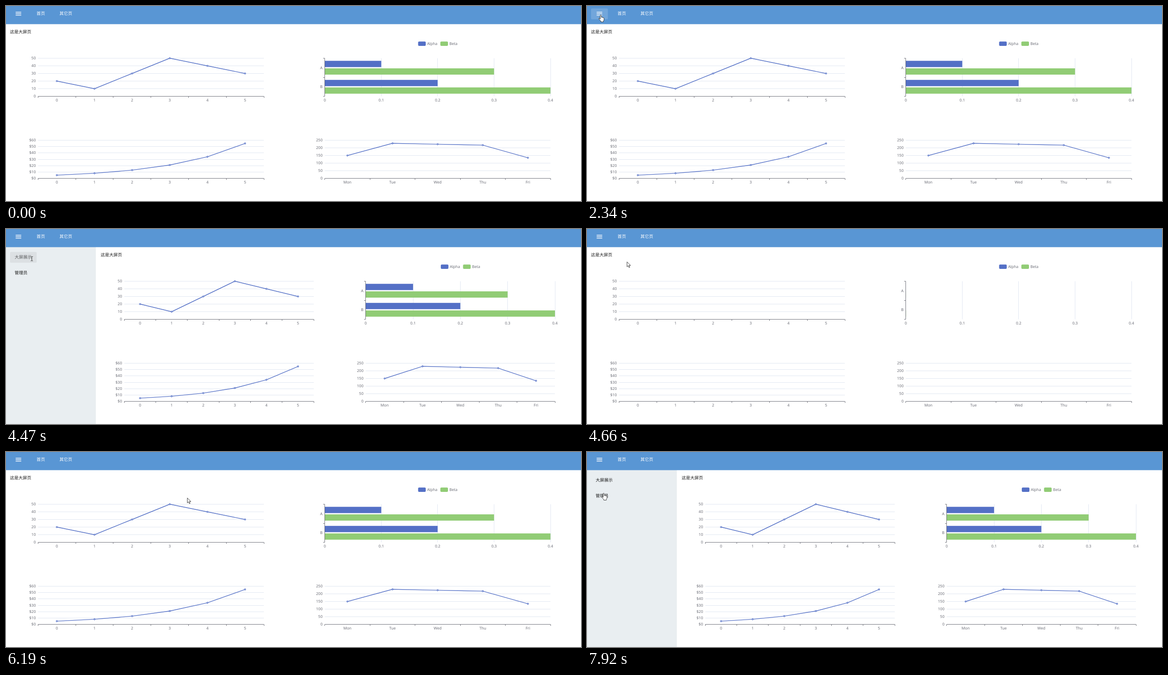
These frames come from a looping animation (1280 px wide and 435 px high, 7.99 s). An HTML page:

```html
<!DOCTYPE html>
<html lang="zh">
<head>
<meta charset="utf-8">
<title>大屏页</title>
<style>
  html, body { margin: 0; width: 100%; height: 100%; overflow: hidden; background: #fff; }
  svg { display: block; width: 100vw; height: 100vh; text-rendering: geometricPrecision; }
  text { font: 8.5px "Noto Sans", "Open Sans", sans-serif; fill: #6e7079; }
  .cjk { font: 9.5px "Noto Sans CJK SC", "Noto Sans CJK", sans-serif; fill: #1c1c1c; }
  .nav { fill: #fff; }
  .dim { fill: #5c5e60; }
  .mid { text-anchor: middle; }
  .end { text-anchor: end; }
  .split { stroke: #e0e6f1; }
  .axis { stroke: #6e7079; fill: none; }
  .line { stroke: #5470c6; stroke-width: 1.4; fill: none; stroke-linejoin: bevel; }
  .dot { fill: #fff; stroke: #5470c6; }
  .pointer { fill: #fff; stroke: #222; stroke-width: .9; stroke-linejoin: round; }
</style>
</head>
<body>
<svg id="stage" viewBox="0 0 1280 435"></svg>
<script>
const LOOP = 7990;
const BLUE = '#5470c6', GREEN = '#91cc75';
const CLICKS = [2367, 7117], REMOUNT = 4540;

// Screen refreshes: [first, last, count]
const REFRESH = [
  [0, 0, 1], [190, 470, 5], [860, 860, 1], [1060, 1800, 12], [1870, 1870, 1],
  [2080, 2210, 3], [2340, 2820, 8], [3030, 3790, 12], [4000, 4260, 5],
  [4470, 5220, 12], [5290, 6050, 12], [6120, 6870, 12], [7010, 7780, 12], [7850, 7920, 2]
].flatMap(([a, b, n]) => Array.from({ length: n }, (_, i) =>
  Math.round((a + (n > 1 ? (b - a) * i / (n - 1) : 0)) / 10) * 10));

// Pointer hot spots: [time, x, y, shape from here on]
const PATH = [
  [190, 1110, 412, 'arrow'], [470, 347, 109, 'arrow'], [800, 347, 109, 'arrow'],
  [860, 343, 96, 'arrow'], [1000, 343, 96, 'arrow'], [1800, 31, 21, 'hand'],
  [1870, 30.5, 20, 'hand'], [2960, 30.5, 20, 'arrow'], [3400, 138, 64, 'arrow'],
  [3790, 48, 58, 'hand'], [3940, 48, 58, 'hand'], [4260, 48, 63, 'hand'],
  [4470, 57.5, 66, 'beam'], [4540, 70, 70, 'arrow'], [5080, 484, 142, 'arrow'],
  [5220, 488, 146, 'arrow'], [5600, 488, 146, 'arrow'], [6050, 435, 110, 'arrow'],
  [6870, 31, 14, 'hand'], [7400, 31, 14, 'arrow'], [7780, 44, 82, 'arrow'],
  [7850, 40, 88, 'hand'], [7920, 37, 92, 'hand'], [LOOP, 37, 92, 'hand']
];

const SHAPES = {
  arrow: '<path class="pointer" d="M0 0V11L2.6 8.6 4.4 12.7 6.2 11.9 4.4 8H7.9Z"/>',
  hand: '<path class="pointer" d="M-1.1 9.3V1.2Q-1 0 .1 0T1.4 1.2V5.2Q2.6 4.4 3.5 5.6 4.8 4.9 5.5 6.1 7.3 5.7 7.4 7.6V10.4Q7.2 12.4 6 13.6V15.4H.4V14Q-1.6 12-4.2 8.5-4.6 7-3.2 7.1Z"/>',
  beam: '<path class="axis" style="stroke:#333" d="M-2.5-4.5H-.8L0-4 .8-4.5H2.5M0-4V4.5M-2.5 5H-.8L0 4.5 .8 5H2.5"/>'
};

const clamp = v => Math.min(1, Math.max(0, v));
const smooth = v => v * v * (3 - 2 * v);
const cubicInOut = v => v < .5 ? 4 * v ** 3 : 1 - 4 * (1 - v) ** 3;

// CSS "ease": cubic-bezier(.25, .1, .25, 1)
function ease(v) {
  let lo = 0, hi = 1;
  for (let i = 0; i < 20; i++) {
    const s = (lo + hi) / 2;
    if (.75 * s - .75 * s * s + s ** 3 < v) lo = s; else hi = s;
  }
  return .3 * lo + 2.4 * lo * lo - 1.7 * lo ** 3;
}

const label = (x, y, s, cls = '') => `<text x="${x}" y="${y}" class="${cls}">${s}</text>`;
const rect = (x, y, w, h, fill, rx = 0) =>
  `<rect x="${x}" y="${y}" width="${w}" height="${h}" fill="${fill}" rx="${rx}"/>`;
const path = (d, cls) => `<path d="${d}" class="${cls}"/>`;

function lineChart(id, { x0, x1, top, max, step, unit = '', names, data }, ms) {
  const width = x1 - x0, bottom = top + 85, band = width / names.length;
  const px = i => x0 + band * (i + .5), py = v => bottom - v / max * 85;
  let out = '';
  for (let v = 0; v <= max; v += step) {
    const y = Math.floor(py(v)) + .5;
    if (v) out += path(`M${x0} ${y}H${x1}`, 'split');
    out += label(x0 - 5, py(v) + 2.6, unit + v, 'end');
  }
  let axis = `M${x0} ${bottom}H${x1}`;
  for (let i = 0; i <= names.length; i++) axis += `M${Math.floor(x0 + band * i) + .5} ${bottom}v3.4`;
  out += path(axis, 'axis');
  names.forEach((name, i) => out += label(px(i), bottom + 11.8, name, 'mid'));
  const shown = width * cubicInOut(clamp(ms / 1000));
  out += `<clipPath id="${id}"><rect x="${x0}" y="${top - 5}" width="${shown}" height="95"/></clipPath>`;
  out += `<g clip-path="url(#${id})">${path('M' + data.map((v, i) => px(i) + ' ' + py(v)).join('L'), 'line')}</g>`;
  data.forEach((v, i) => {
    const k = clamp((ms - 1000 * (i + .5) / names.length) / 200);
    if (k > .05) out += `<circle class="dot" cx="${px(i)}" cy="${py(v)}" r="${1.45 * k}" stroke-width="${1.3 * k}"/>`;
  });
  return out;
}

function barChart(x0, x1, ms) {
  const top = 116.5, unit = (x1 - x0) / 4, mid = (x0 + x1) / 2;
  const grow = cubicInOut(clamp(ms / 1000));
  let out = '';
  for (let i = 0; i <= 4; i++) {
    const x = Math.floor(x0 + unit * i) + .5;
    if (i) out += path(`M${x} ${top}v85`, 'split');
    out += label(x0 + unit * i, 213.3, i ? '0.' + i : '0', 'mid');
  }
  [['A', 1, 3], ['B', 2, 4]].forEach(([name, alpha, beta], i) => {
    const y = top + 42.5 * i;
    out += rect(x0, y + 5.8, alpha * unit * grow, 14, BLUE);
    out += rect(x0, y + 22.6, beta * unit * grow, 14, GREEN);
    out += label(x0 - 5, y + 24, name, 'end');
  });
  const ax = Math.floor(x0) + .5;
  out += path(`M${ax} ${top}v85M${ax} ${top}h-3.4M${ax} 159.5h-3.4M${ax} 201.5h-3.4`, 'axis');
  [['Alpha', -43.5, BLUE], ['Beta', 6, GREEN]].forEach(([name, dx, color]) => {
    out += rect(mid + dx, 79.3, 17, 9.6, color, 2.2) + label(mid + dx + 20, 86.8, name);
  });
  return out;
}

function pointer(t) {
  const next = PATH.findIndex(k => k[0] > t);
  if (next < 1) return '';
  const [ta, xa, ya, shape] = PATH[next - 1], [tb, xb, yb] = PATH[next];
  const k = smooth((t - ta) / (tb - ta));
  return `<g transform="translate(${xa + (xb - xa) * k} ${ya + (yb - ya) * k})">${SHAPES[shape]}</g>`;
}

function render(t) {
  const click = t >= CLICKS[1] ? CLICKS[1] : t < REMOUNT ? CLICKS[0] : LOOP;
  const slide = delay => 200 * ease(clamp((t - click - delay) / 120));
  const drawer = slide(0), pad = slide(16), resized = pad > 80;
  const [l0, l1, r0, r1] = resized ? [263.3, 685.2, 800.8, 1222]
    : [71.3 + pad, 574 + pad, 709.8 + pad / 2, 1212 + pad / 2];
  const age = delay => t < REMOUNT ? 2000 : t - REMOUNT - delay;
  const count = [0, 1, 2, 3, 4, 5];

  let out = rect(0, 0, 1280, 435, '#fff');
  out += label(8.7 + pad * 1.01, 61.4, '这是大屏页', 'cjk');
  out += lineChart('a', { x0: l0, x1: l1, top: 116.5, max: 50, step: 10, names: count,
    data: [20, 10, 30, 50, 40, 30] }, age(25));
  out += barChart(r0, r1, age(12));
  out += lineChart('b', { x0: l0, x1: l1, top: 299.5, max: 60, step: 10, unit: '$', names: count,
    data: [5, 8, 13, 21, 34, 55] }, age(33));
  out += lineChart('c', { x0: r0, x1: r1, top: 299.5, max: 250, step: 50,
    names: ['Mon', 'Tue', 'Wed', 'Thu', 'Fri'], data: [150, 230, 224, 218, 135] }, age(36));

  if (drawer > 0) {
    const hover = t >= 4000 && t < REMOUNT;
    out += `<g transform="translate(${drawer - 200} 0)">` + rect(0, 40, 200, 395, '#e9eef1')
      + (hover ? rect(9, 51.3, 59.3, 24, '#dce0e3', 2) : '')
      + label(19.3, 66.1, '大屏展示', hover ? 'cjk dim' : 'cjk')
      + label(19.3, 101.1, '管理员', 'cjk') + '</g>';
  }

  out += rect(0, 0, 1280, 40.5, '#5996d4');
  if ((t >= 1800 && t < 3090) || (t >= 6800 && t < 7480))
    out += rect(9, 5.5, 37.5, 24.3, 'rgba(255,255,255,.15)', 2);
  for (const y of [13, 16.4, 19.8]) out += rect(21.5, y, 12.4, 1.4, '#fff');
  out += label(68, 20.4, '首页', 'cjk nav') + label(119, 20.4, '其它页', 'cjk nav');
  return out + pointer(t);
}

const stage = document.getElementById('stage');
const start = performance.now();
let shown = -1;
function tick() {
  const now = (performance.now() - start) % LOOP;
  const held = REFRESH.filter(s => s <= now).pop();
  if (held !== shown) stage.innerHTML = render(shown = held);
  requestAnimationFrame(tick);
}
tick();
</script>
</body>
</html>
```
